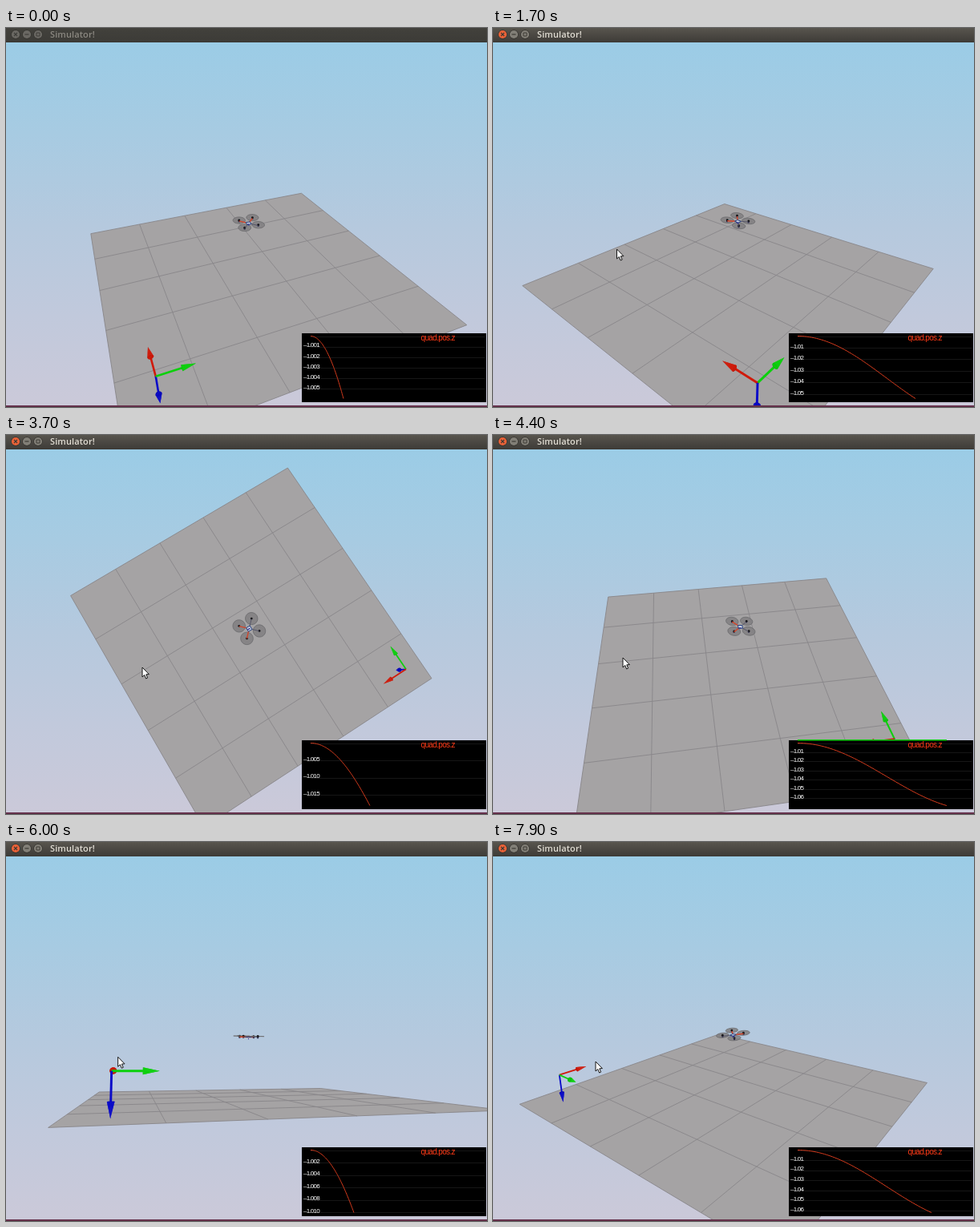
An HTML page with a canvas for the animation above (8000 ms loop, 600 px wide and 473 px high).

```html
<!DOCTYPE html>
<html lang="en">
<head>
<meta charset="utf-8">
<title>Simulator!</title>
<style>
  html, body { margin: 0; width: 100%; height: 100%; overflow: hidden; background: #b8cadf; }
  canvas { display: block; width: 600px; height: 473px; }
</style>
</head>
<body>
<canvas id="view" width="600" height="473"></canvas>
<script>
const ctx = document.getElementById('view').getContext('2d');
const LOOP = 8000, STEP = 100, DEG = Math.PI / 180;

// Orbit camera around a point above the middle of the floor
const FOCAL = 498, EYE = 1.03, CX = 302.5, CY = 242;

// time, yaw, pitch, distance, pointer x, pointer y
const KEYS = [
  [0, 23, 29.5, 6.64, 40, 262],
  [200, 23, 29.5, 6.64, 40, 262],
  [600, 23.5, 29.5, 6.6, 148, 278],
  [1700, 49.5, 23.4, 6.45, 154.5, 276],
  [2100, 66, 21, 6.5, 158, 276],
  [2700, 126, 73, 6.57, 172, 289],
  [2800, 133.6, 80.5, 6.58, 174, 291],
  [3700, 122, 82, 6.6, 170, 290],
  [4300, 100, 54, 6.6, 163, 281],
  [4400, 98, 43.3, 6.6, 162, 278],
  [4500, 95, 30, 6.6, 161, 275],
  [4800, 82, -6, 6.6, 157, 267],
  [5100, 70, -10, 6.6, 154, 266],
  [6700, -26.5, 0, 6.6, 128.5, 270],
  [7200, -29, 4, 6.6, 128.5, 271],
  [7900, -38, 17, 6.6, 128, 274]
];

// Moments at which the simulated flight starts over
const RESETS = [-256, 781, 2019, 3238, 4494, 5663, 6856];

function pose(t) {
  let i = 0;
  while (i < KEYS.length - 2 && t >= KEYS[i + 1][0]) i++;
  const a = KEYS[i], b = KEYS[i + 1];
  const k = Math.min(1, (t - a[0]) / (b[0] - a[0]));
  return a.map((v, j) => v + (b[j] - v) * k);
}

function camera(yaw, pitch, dist) {
  const cy = Math.cos(yaw * DEG), sy = Math.sin(yaw * DEG);
  const cp = Math.cos(pitch * DEG), sp = Math.sin(pitch * DEG);
  return ([x, y, h]) => {
    const side = -x * sy + y * cy;
    const near = -x * cy - y * sy;
    const rise = h - EYE;
    const depth = dist - near * cp - rise * sp;
    const k = FOCAL / depth;
    return { x: CX + side * k, y: CY - (rise * cp - near * sp) * k, k, depth };
  };
}

function path(pts, close) {
  ctx.beginPath();
  pts.forEach(p => ctx.lineTo(p.x, p.y));
  if (close) ctx.closePath();
}

function fillPath(pts, color) {
  path(pts, true);
  ctx.fillStyle = color;
  ctx.fill();
}

function strokePath(pts, color, width, close) {
  path(pts, close);
  ctx.strokeStyle = color;
  ctx.lineWidth = width;
  ctx.stroke();
}

function dot(x, y, r, color) {
  ctx.beginPath();
  ctx.arc(x, y, r, 0, Math.PI * 2);
  ctx.fillStyle = color;
  ctx.fill();
}

function sky() {
  const g = ctx.createLinearGradient(0, 18, 0, 473);
  g.addColorStop(0, '#9bcce6');
  g.addColorStop(0.25, '#a7cbe2');
  g.addColorStop(0.5, '#b5c9de');
  g.addColorStop(0.75, '#c1c9dc');
  g.addColorStop(1, '#cbc9d9');
  ctx.fillStyle = g;
  ctx.fillRect(0, 18, 600, 455);
}

function floor(proj) {
  const S = 2.5;
  fillPath([[-S, -S, 0], [S, -S, 0], [S, S, 0], [-S, S, 0]].map(proj), '#a5a3a4');
  for (let i = -S; i <= S; i++) {
    strokePath([[i, -S, 0], [i, S, 0]].map(proj), '#888689', 0.9);
    strokePath([[-S, i, 0], [S, i, 0]].map(proj), '#888689', 0.9);
  }
}

const ORIGIN = [-2.02, -2.02, 0.48];

function arrow(proj, axis, color, dark) {
  const len = 0.48, neck = 0.31, rad = 0.037;
  const along = d => ORIGIN.map((v, i) => v + axis[i] * d);
  const [u, v] = [0, 1, 2].filter(j => !axis[j]);
  const ring = [];
  for (let i = 0; i < 16; i++) {
    const p = along(neck);
    p[u] += Math.cos(i * Math.PI / 8) * rad;
    p[v] += Math.sin(i * Math.PI / 8) * rad;
    ring.push(proj(p));
  }
  const o = proj(ORIGIN), tip = proj(along(len));
  strokePath([o, proj(along(neck))], color, o.k * 0.024);
  fillPath(ring, dark);
  ring.forEach((p, i) => fillPath([p, ring[(i + 1) % 16], tip], color));
}

function triad(proj) {
  [
    [[1, 0, 0], '#d01a0a', '#a01208'],
    [[0, 1, 0], '#0cd00c', '#089408'],
    [[0, 0, -1], '#0a0ac8', '#080890']
  ].map(a => ({ a, d: proj(ORIGIN.map((v, i) => v + a[0][i])).depth }))
    .sort((p, q) => q.d - p.d)
    .forEach(({ a }) => arrow(proj, ...a));
}

const climb = v => 0.0725 * (1 - Math.cos(Math.PI * v / 222)) / 2;

function drone(proj, v) {
  const tilt = 0.12 * Math.min(1, v / 90), drift = -0.08 * (v / 186) ** 2;
  const h = 1 + climb(v);
  const at = (x, y, z = 0) => proj([
    drift + x * Math.cos(tilt) - z * Math.sin(tilt), y,
    h + x * Math.sin(tilt) + z * Math.cos(tilt)
  ]);
  const A = 0.122, R = 0.103;
  const rotors = [[A, A], [A, -A], [-A, A], [-A, -A]]
    .map(([x, y]) => ({ x, y, hub: at(x, y, 0.015) }))
    .sort((p, q) => q.hub.depth - p.hub.depth);
  const mid = at(0, 0);

  for (const { x, y, hub } of rotors) {
    const disc = [];
    for (let i = 0; i < 24; i++) {
      const a = i * Math.PI / 12;
      disc.push(at(x + R * Math.cos(a), y + R * Math.sin(a), 0.015));
    }
    fillPath(disc, 'rgba(128,127,129,0.85)');
    strokePath(disc, '#6a6a6c', 0.8, true);
    strokePath([hub, at(x, y, -0.02)], '#26264c', 2);
    dot(hub.x, hub.y, 1.4, '#161618');
  }
  for (const { x, y } of rotors) {
    strokePath([mid, at(x, y)], x > 0 ? '#d2452a' : '#4c4c62', x > 0 ? 1.4 : 0.8);
  }
  const B = 0.036;
  const body = [at(B, B), at(B, -B), at(-B, -B), at(-B, B)];
  fillPath(body, '#c4ccdc');
  strokePath(body, '#27407e', 1, true);
  strokePath([at(-0.02, 0, -0.03), at(0.03, 0, -0.03)], '#2a2a90', 1.2);
}

function tickStep(range) {
  const p = 10 ** Math.floor(Math.log10(range));
  return [0.1, 0.2, 0.5, 1, 2].map(f => f * p).find(s => range / s < 7);
}

function plot(v) {
  const top = 384.5, high = 78, left = 380;
  const range = climb(v), step = tickStep(range);
  const places = -Math.floor(Math.log10(step) + 1e-9);
  ctx.fillStyle = '#000';
  ctx.fillRect(369, 381, 230, 86);

  ctx.font = '8px "Liberation Sans", Arial, sans-serif';
  ctx.letterSpacing = '-0.75px';
  ctx.textBaseline = 'alphabetic';
  for (let n = 0; n * step < range; n++) {
    const y = top + high * n * step / range;
    ctx.fillStyle = '#161616';
    ctx.fillRect(left, Math.round(y), 217, 1);
    if (!n) continue;
    ctx.fillStyle = '#fff';
    ctx.fillText('–' + (1 + n * step).toFixed(places), 371, y + 0.8);
  }

  const curve = [];
  for (let i = 0; i <= 50; i++) {
    const u = v * i / 50;
    curve.push({ x: left + u, y: top + high * climb(u) / range });
  }
  strokePath(curve, '#d23a1c', 1);

  ctx.font = '10px "Liberation Sans", Arial, sans-serif';
  ctx.letterSpacing = '-0.65px';
  ctx.fillStyle = '#ff3a16';
  ctx.fillText('quad.pos.z', 517.5, 389.5);
  ctx.letterSpacing = '0px';

  if (v > 180) {
    ctx.fillStyle = '#0cd00c';
    ctx.fillRect(left, 380, v, 1.5);
  }
}

function titleBar(active) {
  const g = ctx.createLinearGradient(0, 0, 0, 18);
  g.addColorStop(0, active ? '#58554e' : '#42413c');
  g.addColorStop(1, active ? '#3d3b37' : '#3c3b37');
  ctx.fillStyle = g;
  ctx.fillRect(0, 0, 600, 18);

  [12, 26, 40].forEach((x, i) => {
    const mark = active ? '#3c3a35' : '#3e3d39';
    dot(x, 8, 5.7, active ? '#33312d' : '#35342f');
    dot(x, 8, 5.1, !active ? '#6a6863' : i ? '#827f77' : '#ea6238');
    if (i === 0) {
      strokePath([{ x: x - 2, y: 6 }, { x: x + 2, y: 10 }], mark, 1.1);
      strokePath([{ x: x + 2, y: 6 }, { x: x - 2, y: 10 }], mark, 1.1);
    } else if (i === 1) {
      strokePath([{ x: x - 2.5, y: 8 }, { x: x + 2.5, y: 8 }], mark, 1.2);
    } else {
      ctx.lineWidth = 1;
      ctx.strokeStyle = mark;
      ctx.strokeRect(x - 2, 6, 4, 4);
    }
  });

  ctx.font = '600 11px "Open Sans", "Noto Sans", sans-serif';
  ctx.letterSpacing = '0.1px';
  ctx.fillStyle = active ? '#e2ded4' : '#8b8881';
  ctx.fillText('Simulator!', 55, 12);
}

function pointer(x, y) {
  const shape = [[0, 0], [0, 12], [2.8, 9.5], [4.6, 14], [6.6, 13.1], [4.8, 8.8], [8.4, 8.6]]
    .map(([a, b]) => ({ x: x + a, y: y + b }));
  fillPath(shape, '#fff');
  strokePath(shape, '#151515', 1, true);
}

function draw(t) {
  const [, yaw, pitch, dist, mx, my] = pose(t);
  const start = RESETS.filter(r => r <= t).pop();
  const v = Math.max(2, (t - start) * 0.16);
  const proj = camera(yaw, pitch, dist);
  const active = t >= 200;

  ctx.lineJoin = 'round';
  sky();
  // The floor is only visible from above
  if (EYE + dist * Math.sin(pitch * DEG) > 0) floor(proj);
  triad(proj);
  drone(proj, v);
  plot(v);
  ctx.fillStyle = '#64304a';
  ctx.fillRect(0, 471, 600, 2);
  titleBar(active);
  if (active) pointer(mx, my);
}

let begin;
function frame(now) {
  if (begin === undefined) begin = now;
  const t = (now - begin) % LOOP;
  draw(Math.floor(t / STEP) * STEP);
  requestAnimationFrame(frame);
}
requestAnimationFrame(frame);
</script>
</body>
</html>
```
